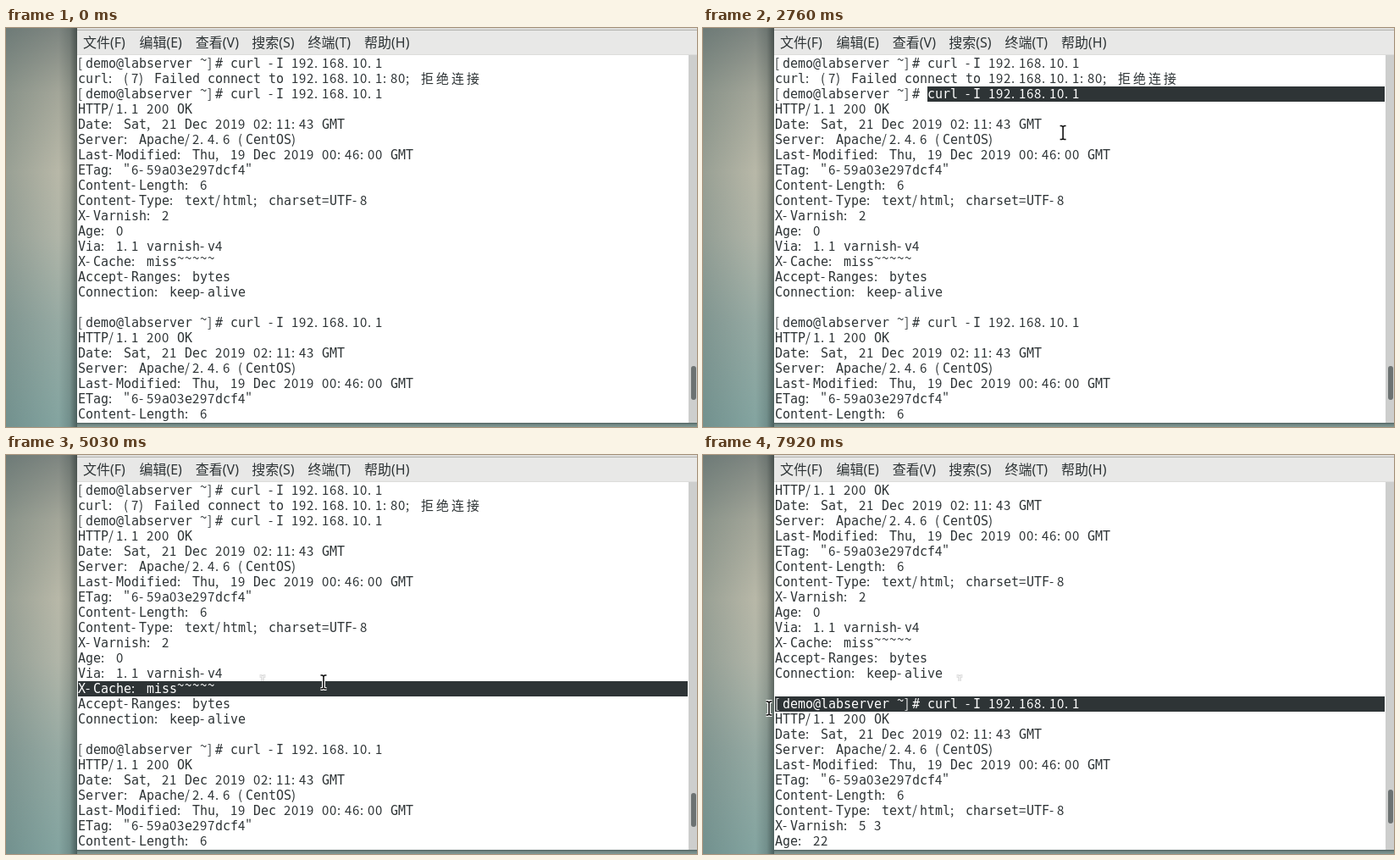
An HTML page that plays this animation: 816 px wide and 471 px high, repeating every 8 s.

```html
<!DOCTYPE html>
<html lang="zh">
<head>
<meta charset="utf-8">
<title>Terminal session</title>
<style>
  html, body { margin: 0; width: 100%; height: 100%; overflow: hidden; }
  #stage { position: relative; width: 816px; height: 471px; overflow: hidden;
    background: linear-gradient(90deg, rgba(70, 96, 96, .28), transparent 62px),
      linear-gradient(#7d8580, #a3a699 16%, #b8b8a8 36%, #b0b5a8 52%, #96aaa3 74%, #83a4a0); }
  #shade { position: absolute; left: 62px; top: 0; width: 22px; height: 471px;
    background: linear-gradient(90deg, transparent, rgba(20, 35, 35, .16) 60%, rgba(15, 25, 25, .5)); }
  #floor { position: absolute; left: 84px; top: 466px; width: 732px; height: 5px;
    background: linear-gradient(#4f605f, #6f8582 40%, #819a96); }
  #win { position: absolute; left: 84px; top: 0; width: 732px; height: 466px; background: #fff; }
  #menu { position: absolute; inset: 0 0 auto; height: 32px; box-sizing: border-box;
    background: linear-gradient(#dededc 2px, #b4b4b1 2px 3px, #e8e8e7 3px); border-bottom: 1px solid #dcdcda; }
  #track { position: absolute; left: 722px; top: 32px; width: 10px; height: 434px; background: #cdcecd; }
  #thumb { position: absolute; left: 3px; width: 6px; height: 40px; border-radius: 3px; background: #6c7272; }
  svg { position: absolute; left: 0; top: 0; width: 816px; height: 471px; }
  .mono { font: 15px "DejaVu Sans Mono", monospace; }
  .thin { font: 300 15px "Noto Sans CJK SC", "Noto Sans CJK", sans-serif; }
  .menu { font: 16px "Noto Sans", "Noto Sans CJK SC", "Noto Sans CJK", sans-serif; fill: #2e3436; }
</style>
</head>
<body>
<div id="stage">
  <div id="shade"></div>
  <div id="floor"></div>
  <div id="win">
    <div id="menu"></div>
    <div id="track"><div id="thumb"></div></div>
  </div>
  <svg viewBox="0 0 816 471">
    <defs>
      <clipPath id="screen"><rect x="84" y="33" width="722" height="432"/></clipPath>
      <clipPath id="selClip"><rect class="sel"/></clipPath>
      <clipPath id="ghostClip"><rect id="ghostBox" x="295" y="255" width="16"/></clipPath>
      <path id="beam" d="M-3.5-8H-1.5L0-7 1.5-8H3.5M0-7V7M-3.5 8H-1.5L0 7 1.5 8H3.5" fill="none"/>
    </defs>
    <g id="labels" class="menu"></g>
    <g clip-path="url(#screen)">
      <g id="page">
        <g id="text" class="mono" fill="#2e3436"></g>
        <rect class="sel" fill="#2e3436"/>
        <g clip-path="url(#selClip)"><use href="#text" id="inverse"/></g>
      </g>
    </g>
    <g id="ghost" clip-path="url(#ghostClip)">
      <use href="#beam" x="303" y="269" stroke="#d9d9d9" stroke-width="3.5"/>
      <use href="#beam" x="303" y="269" stroke="#fafafa" stroke-width="1"/>
    </g>
    <g id="cursor">
      <use href="#beam" stroke="#fff" stroke-width="4"/>
      <use href="#beam" stroke="#111" stroke-width="1.6"/>
    </g>
  </svg>
</div>
<script>
const $ = id => document.getElementById(id);
const LOOP = 8000, LEFT = 85, TOP = 33, CELL = 9, ROW = 18, COLS = 80;

const prompt = '[demo@labserver ~]# curl -I 192.168.10.1';
const headers = [
  'HTTP/1.1 200 OK', 'Date: Sat, 21 Dec 2019 02:11:43 GMT', 'Server: Apache/2.4.6 (CentOS)',
  'Last-Modified: Thu, 19 Dec 2019 00:46:00 GMT', 'ETag: "6-59a03e297dcf4"',
  'Content-Length: 6', 'Content-Type: text/html; charset=UTF-8'
];
const lines = [
  prompt, 'curl: (7) Failed connect to 192.168.10.1:80; 拒绝连接', prompt, ...headers,
  'X-Varnish: 2', 'Age: 0', 'Via: 1.1 varnish-v4', 'X-Cache: miss~~~~~',
  'Accept-Ranges: bytes', 'Connection: keep-alive', '',
  prompt, ...headers, 'X-Varnish: 5 3', 'Age: 22'
];

// Letters are monospaced; digits and signs come from a lighter face, set on the same cell grid.
function rowMarkup(line, row) {
  const base = TOP + 14 + row * ROW;
  const cols = [];
  let col = 0;
  for (const ch of line) {
    cols.push(col);
    col += ch > '\u2e80' ? 2 : 1;
  }
  const runs = [...line.matchAll(/[A-Za-z@#]+|~+|[^A-Za-z@#~ ]+/g)].map(m => {
    const xs = [...m[0]].map((_, i) => LEFT + cols[m.index + i] * CELL);
    const style = /[A-Za-z@#]/.test(m[0]) ? '' : ' class="thin"';
    const y = m[0][0] === '~' ? base - 4 : base;
    return `<tspan x="${xs.join(' ')}" y="${y}"${style}>${m[0]}</tspan>`;
  });
  return `<text>${runs.join('')}</text>`;
}
$('text').innerHTML = lines.map(rowMarkup).join('');
$('text').removeAttribute('fill');
$('page').setAttribute('fill', '#2e3436');
$('inverse').setAttribute('fill', '#fff');

$('labels').innerHTML = ['文件(F)', '编辑(E)', '查看(V)', '搜索(S)', '终端(T)', '帮助(H)']
  .map((s, i) => `<text x="${91 + i * 66.4}" y="23">${s}</text>`).join('');

// Pointer moves: first step, last step, number of steps, end x, end y.
const moves = [
  [290, 440, 3, 428, 166], [590, 590, 1, 436, 169], [670, 1350, 10, 268, 81],
  [1440, 1440, 1, 265, 80], [1670, 1900, 4, 335, 76], [1980, 2440, 7, 438, 78],
  [2520, 2600, 2, 460, 82], [2680, 3310, 9, 303, 269], [3380, 3470, 2, 272, 264],
  [3620, 3620, 1, 260, 274], [3710, 3710, 1, 267, 271], [4020, 4630, 9, 75, 276],
  [4710, 4710, 1, 72, 279], [4790, 5030, 4, 375, 268], [5180, 5650, 7, 402, 266],
  [6200, 6200, 1, 401, 267], [6360, 6510, 3, 390, 266], [6670, 6890, 4, 455, 295],
  [6970, 7220, 4, 409, 294], [7290, 7450, 3, 184, 301], [7540, 7690, 3, 110, 303],
  [7770, 7920, 3, 78, 299]
];

function pointer(t) {
  let x = 667, y = 434;
  for (const [from, to, steps, endX, endY] of moves) {
    if (t < from) break;
    const done = steps > 1 ? Math.floor((t - from) / (to - from) * (steps - 1) + 1e-6) + 1 : 1;
    const f = Math.min(done / steps, 1);
    x += (endX - x) * f;
    y += (endY - y) * f;
  }
  return [x, y];
}

function selection(t, x) {
  const col = Math.max(0, Math.round((x - LEFT) / CELL));
  const toEnd = (row, start) => start < lines[row].length ? [row, start, COLS] : [row, 0, 0];
  if (t >= 1670 && t < 4020) return [2, 20, t < 2520 ? Math.max(20, col) : COLS];
  if (t >= 4020 && t < 5420) return toEnd(13, t < 4710 ? col : 0);
  if (t >= 6970) return toEnd(17, col);
  return [0, 0, 0];
}

const selRects = document.querySelectorAll('.sel');

function draw(now) {
  const t = now % LOOP;
  const [x, y] = pointer(t);
  const [row, start, end] = selection(t, x);
  for (const r of selRects) {
    r.setAttribute('x', LEFT + start * CELL);
    r.setAttribute('y', TOP + row * ROW);
    r.setAttribute('width', (end - start) * CELL);
    r.setAttribute('height', ROW);
  }
  const scrolled = t >= 5960;
  $('page').setAttribute('transform', `translate(0 ${scrolled ? -3 * ROW : 0})`);
  $('thumb').style.top = (scrolled ? 363 : 367) + 'px';

  const hidden = t < 70 || (t >= 7215 && t < 7290);
  $('cursor').setAttribute('transform', `translate(${x} ${y})`);
  $('cursor').setAttribute('visibility', hidden ? 'hidden' : 'visible');
  // A faint trace stays behind; the later selection wipes its lower part.
  $('ghost').setAttribute('visibility', t >= 3380 ? 'visible' : 'hidden');
  $('ghostBox').setAttribute('height', t < 4020 ? 30 : 12);
}

let began;
function tick(now) {
  began ??= now;
  draw(now - began);
  requestAnimationFrame(tick);
}
draw(0);
requestAnimationFrame(tick);
</script>
</body>
</html>
```
